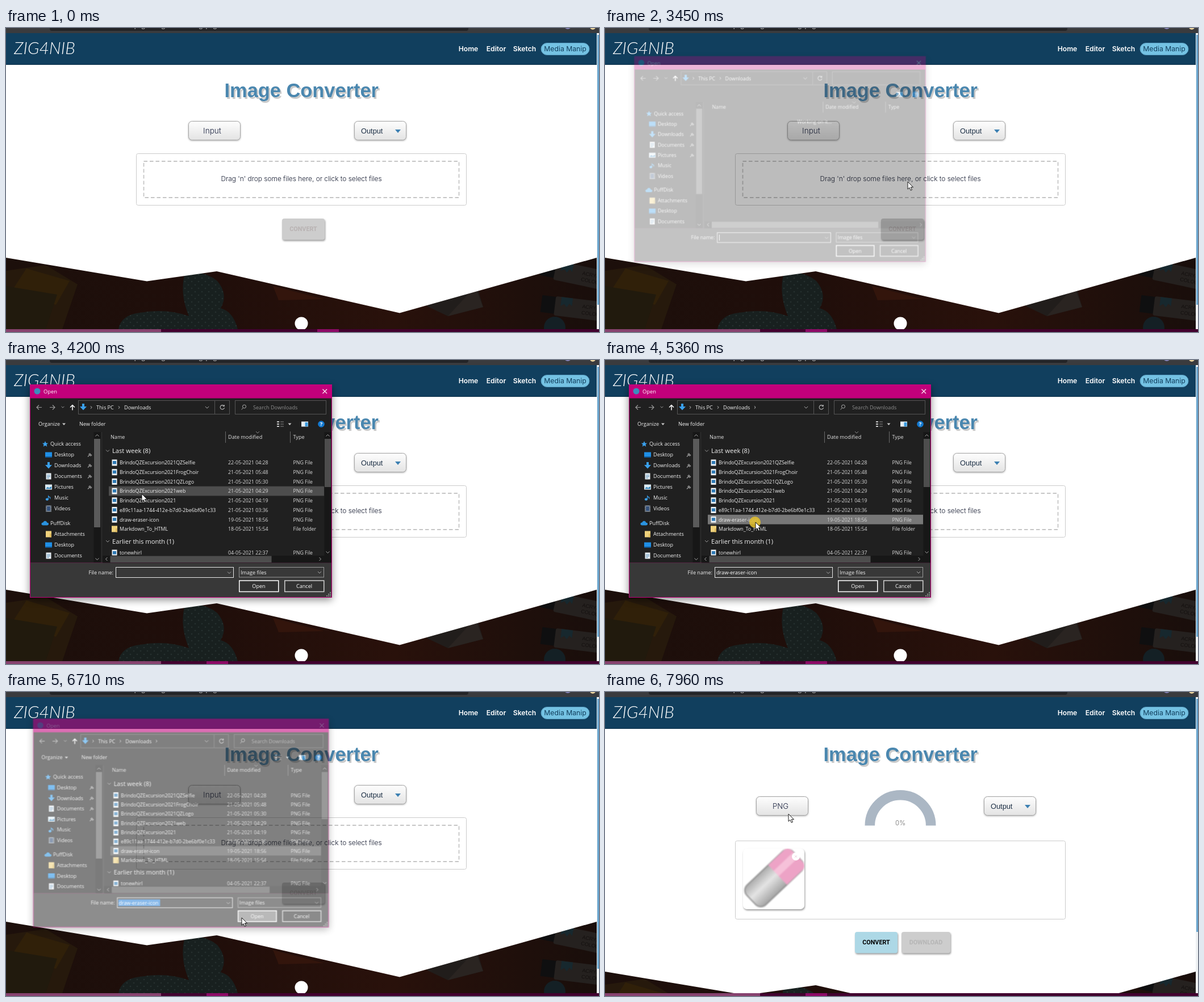
Animation, 1044 px wide and 536 px high, one loop 8 s. Source, as an HTML page:

```html
<!DOCTYPE html>
<html lang="en">
<head>
<meta charset="utf-8">
<title>Image Converter</title>
<style>
  html, body { margin: 0; width: 100%; height: 100%; overflow: hidden; background: #fff; }
  svg { display: block; width: 100%; height: 100%; }
  text { white-space: pre; }
  .ui { font-family: "Open Sans", "Noto Sans", sans-serif; }
  .web { font-family: Inter, sans-serif; }
  .arial { font-family: "Liberation Sans", Arial, sans-serif; }
  .btn { font-family: Roboto, sans-serif; font-weight: 700; }
  .logo { font-family: Lato, sans-serif; font-style: italic; font-weight: 300; }
  #dialog { transform-origin: 308px 230.8px; }
  #ring { transform-origin: 543.3px 270.7px; }
  .soft { filter: drop-shadow(1px 2px 1.5px rgba(0,0,0,.4)); }
  .key { filter: drop-shadow(0 1px 1.5px rgba(0,0,0,.3)); }
</style>
</head>
<body>
<svg id="stage" viewBox="0 0 1044 536" preserveAspectRatio="none"></svg>
<script>
const LOOP = 8000;

// ---- drawing helpers ----
const rect = (x, y, w, h, fill, more = '') =>
  `<rect x="${x}" y="${y}" width="${w}" height="${h}" fill="${fill}" ${more}/>`;
const frame = (x, y, w, h, line, more = '') =>
  rect(x + .5, y + .5, w - 1, h - 1, 'none', `stroke="${line}" ${more}`);
const text = (x, y, str, size, fill, cls = 'ui', more = '') =>
  `<text x="${x}" y="${y}" font-size="${size}" fill="${fill}" class="${cls}" ${more}>${str}</text>`;
const mid = 'text-anchor="middle"';
const path = (d, line, width = 1, fill = 'none', more = '') =>
  `<path d="${d}" stroke="${line}" stroke-width="${width}" fill="${fill}" ${more}/>`;
const shape = (d, fill, more = '') => `<path d="${d}" fill="${fill}" ${more}/>`;
const dot = (x, y, r, fill, more = '') => `<circle cx="${x}" cy="${y}" r="${r}" fill="${fill}" ${more}/>`;
const group = (id, body, more = '') => `<g id="${id}" ${more}>${body}</g>`;
// small chevron pointing down, up, left or right
const chev = (x, y, dir, line = '#aaa', s = 3) => {
  const turn = { down: 0, left: 90, up: 180, right: 270 }[dir];
  return path(`M${-s} ${-s / 2}L0 ${s / 2}L${s} ${-s / 2}`, line, 1, 'none', `transform="translate(${x} ${y}) rotate(${turn})"`);
};

// ---- page ----
const key = (x, y) => rect(x + .5, y + .5, 91, 33, 'url(#face)', 'rx="6" stroke="#a6a6a6" class="key"');
const output = (x, y) => key(x, y) + text(x + 12, y + 22, 'Output', 12.8, '#1c2f45', 'arial') +
  shape(`M${x + 72} ${y + 15}h10l-5 6z`, '#3c80b2');
const plate = (x, y, w, label, fill, ink, id = '') =>
  rect(x, y, w, 37.5, fill, `rx="4" class="soft" id="${id}"`) +
  text(x + w / 2, y + 21.6, label, 10.8, ink, 'btn', mid);

const defs = `<defs>
  <linearGradient id="face" x2="0" y2="1"><stop stop-color="#fefefe"/><stop offset="1" stop-color="#e3e3e3"/></linearGradient>
  <linearGradient id="wood"><stop stop-color="#1c0f0b"/><stop offset=".35" stop-color="#200e0a"/><stop offset=".65" stop-color="#29110b"/><stop offset="1" stop-color="#190e0b"/></linearGradient>
  <linearGradient id="steel" x2="0" y2="1"><stop stop-color="#ababab"/><stop offset=".45" stop-color="#e4e4e4"/><stop offset="1" stop-color="#a4a4a4"/></linearGradient>
  <pattern id="dots" width="12" height="12" patternUnits="userSpaceOnUse">${dot(3, 3, 1.3, '#26302f')}${dot(9, 9, 1.3, '#26302f')}</pattern>
  <clipPath id="view"><rect y="9" width="1040" height="522"/></clipPath>
  <clipPath id="list"><rect x="170" y="127" width="391" height="217.5"/></clipPath>
  <clipPath id="card"><rect x="243" y="276" width="108" height="107" rx="7"/></clipPath>
</defs>`;

const wing = 'M314 436Q345 424 372 446Q392 470 378 494Q400 500 408 531H198Q202 506 236 502Q282 494 322 508Q306 470 314 436z';
const tube = (x, y, turn) => `<g transform="translate(${x} ${y}) rotate(${turn})">
  ${rect(-58, -16, 28, 30, '#0f0f10')}${rect(-34, -17, 90, 34, '#25211f', 'rx="3"')}
  ${shape('M-24-17h20v14l-5-4-4 7-5-5-6 4z', '#17282e')}
  ${text(14, -2, 'ACRYLIC', 9, '#14100f', 'arial')}${text(14, 9, 'COLOUR', 9, '#14100f', 'arial')}</g>`;
const footer = group('footer',
  `<clipPath id="zig"><path d="M0 405L248 446.5L371 429L693 502.5L1040 405V560H0z"/></clipPath>
  <g clip-path="url(#zig)">${rect(0, 400, 1040, 160, 'url(#wood)')}
  ${shape('M0 428L70 418L126 452L96 540H0z', '#26190c')}${shape('M36 424L112 446L88 488L6 470z', '#302009')}
  ${shape('M0 455L90 470L70 531H0z', '#211a0d')}
  ${shape(wing, '#18201f')}${shape(wing, 'url(#dots)')}
  ${shape('M470 455L560 478L480 480z', '#33150c')}
  ${shape('M740 490L828 452L840 492L778 508z', '#211d1b')}${shape('M778 508L826 456L840 492z', '#2a2421')}
  ${tube(1000, 434, 12)}${tube(1000, 494, 7)}${dot(966, 528, 19, '#142025')}
  ${dot(520, 521, 11.5, '#fff')}</g>`);

const before = group('before',
  key(321, 164) + text(363, 185.5, 'Input', 13.6, '#1c2440', 'web', mid + ' font-weight="300"') + output(613, 164) +
  frame(229, 221, 582, 92, '#cbcbcb', 'rx="3"') +
  rect(242.5, 235, 555, 64, 'none', 'stroke="#c6c6c6" stroke-width="1.8" stroke-dasharray="6.5 4"') +
  text(520, 270, "Drag 'n' drop some files here, or click to select files", 11.9, '#151b30', 'web', mid + ' font-weight="300"') +
  plate(486, 336, 75, 'CONVERT', '#cdcdcd', '#b8b2b2'));

const after = group('after',
  key(266, 184) + text(309, 206, 'PNG', 13.2, '#1c2440', 'web', mid + ' font-weight="300"') + output(667, 184) +
  path('M466.3 235.5a53.7 53.7 0 0 1 107.4 0', '#abb7c4', 17.6) +
  text(520, 235, '0%', 11.5, '#6a6a6a', 'web', mid + ' font-weight="300"') +
  frame(229, 262, 582, 139, '#cbcbcb', 'rx="3"') +
  rect(243, 276, 108, 107, '#fff', 'rx="7" class="soft"') +
  `<g clip-path="url(#card)"><g transform="translate(298 328) rotate(-43.5)" style="filter:blur(1px)">
    ${rect(-56, -24, 112, 48, 'url(#steel)', 'rx="13" stroke="#8c8c8c" stroke-width="2"')}
    ${shape('M8-24H46q10 0 10 12V12q0 12-10 12H8z', '#eda3c6')}${rect(8, -10, 48, 13, '#f6c1d9')}
  </g></g>` + dot(336, 290, 7, '#fff') + path('M334 288l4 4m0-4l-4 4', '#ecd7e2', 1) +
  plate(440, 423, 75, 'CONVERT', '#add8e6', '#000', 'go') +
  plate(522, 423, 86, 'DOWNLOAD', '#cdcdcd', '#b5b5b5'));

const nav = rect(0, 9, 1040, 56, '#113f5e') + rect(0, 64, 1040, 1, '#0d3048') +
  text(14, 46, 'ZIG4NIB', 30, '#fff', 'logo') +
  [[814, 'Home'], [863, 'Editor'], [913, 'Sketch']]
    .map(([x, s]) => text(x, 41, s, 12.2, '#fff', 'web', mid + ' font-weight="600"')).join('') +
  rect(942, 26.5, 85, 21, '#74c2e3', 'rx="10.5" stroke="#5a9fc2"') +
  text(984.5, 41, 'Media Manip', 12.2, '#113f5e', 'web', mid);

const chrome = rect(0, 0, 1044, 9, '#3a3b3e') + rect(77, -10, 737, 15, '#232427', 'rx="4"') +
  text(112, -1, 'localhost:3000/media-page/image, converting, png', 11, '#d8d8d8', 'ui') +
  dot(989, -4, 6, '#8784bb') + dot(1033, -2, 5, '#e6cf9b');
const bar = rect(0, 531, 1044, 5, '#42022f') + rect(0, 531, 273, 5, '#87426f') +
  rect(548, 531, 38, 5, '#8c0a66', 'id="task"');
const scroll = rect(1040, 9, 4, 522, '#eef1f3') + rect(1041, 12, 3, 476, '#6aa6cf', 'id="thumb"');

const page = rect(0, 0, 1044, 536, '#fff') + `<g clip-path="url(#view)">${footer}</g>` + nav +
  text(387, 124.5, 'Image Converter', 34.4, '#cbcbcb', 'arial', 'font-weight="700"') +
  text(384.5, 122, 'Image Converter', 34.4, '#4a87af', 'arial', 'font-weight="700"') +
  before + after + scroll + chrome + bar;

// ---- file dialog ----
const blue = '#3aa0ec';
const icons = {
  star: (x, y) => shape(`M${x} ${y - 5}l1.5 3.4 3.6.3-2.7 2.4.9 3.6-3.3-2-3.3 2 .9-3.6-2.7-2.4 3.6-.3z`, blue),
  screen: (x, y) => rect(x - 6, y - 4.5, 12, 8, '#1f8fe6') + rect(x - 6, y + 3.5, 12, 1.5, '#0d5fa8'),
  down: (x, y) => shape(`M${x - 2} ${y - 6}h4v5h4l-6 6.5-6-6.5h4z`, blue),
  page: (x, y) => rect(x - 4.5, y - 5.5, 9, 11, '#e8eef2') + path(`M${x - 3} ${y - 2}h6m-6 2.5h6m-6 2.5h4`, '#4a86b4'),
  image: (x, y) => rect(x - 6, y - 4.5, 12, 9, '#dcebf3') + shape(`M${x - 5} ${y + 3}l3-3 3 1.6 4-2.6v4z`, '#2d80ba'),
  note: (x, y) => shape(`M${x - 1} ${y - 6}q0 3 4 4.5q1 3-1 4q1-3-2-4v4a2.6 2.2 0 1 1-1-1.6z`, blue),
  film: (x, y) => rect(x - 5, y - 5.5, 10, 11, '#8d99a5') + rect(x - 2.8, y - 4, 5.6, 8, '#34507a') +
    path(`M${x - 4} ${y - 5}v10m8-10v10`, '#222', 1.2, 'none', 'stroke-dasharray="1.2 1.2"'),
  cloud: (x, y) => shape(`M${x - 4} ${y + 4}q-3-.5-2.5-3.2q.6-2 2.8-1.8q1.3-3.5 4.6-2.6q2 .6 2.4 2.8q3 .2 2.8 2.6q-.3 2-2.4 2.2z`, '#2a93e0'),
  folder: (x, y) => rect(x - 5, y - 5.5, 10, 11, '#f0d27c') + rect(x + 2, y - 1, 3, 6.5, '#dcb95c'),
  file: (x, y) => rect(x - 4.5, y - 5.5, 9, 11, '#eef2f5') + rect(x - 3, y - 3, 6, 5.5, '#2c79b5')
};
const pin = y => path(`M144 ${y + 3.5}l3-3m-1.5-2l4 4m-2.5-5l4 4`, '#9a9a9a', 1.3);
const side = [
  ['star', 'Quick access', 148, 0], ['screen', 'Desktop', 167, 1, 1], ['down', 'Downloads', 186, 1, 1],
  ['page', 'Documents', 205, 1, 1], ['image', 'Pictures', 224, 1, 1], ['note', 'Music', 243, 1], ['film', 'Videos', 262, 1],
  ['cloud', 'PuffDisk', 287.5, 0], ['folder', 'Attachments', 307, 1], ['screen', 'Desktop', 326, 1], ['page', 'Documents', 345, 1]
].map(([icon, name, y, deep, pinned]) => icons[icon](deep ? 75 : 69, y) +
  text(deep ? 85 : 78, y + 3.3, name, 9.1, '#f0f0f0') + (pinned ? pin(y) : '')).join('');

const rowY = i => 181 + 16.7 * i;
const album = 'BrindoQZExcursion2021';
const fileRow = (y, name, date, type = 'PNG File') =>
  icons[type === 'PNG File' ? 'file' : 'folder'](191, y) + text(200, y + 3.3, name, 8.8, '#f2f2f2') +
  text(391, y + 3.3, date, 8.8, '#d8d8d8') + text(505.5, y + 3.3, type, 8.8, '#d8d8d8');
const files = [
  [album + 'QZSelfie', '22-05-2021 04:28'], [album + 'FrogChoir', '21-05-2021 05:48'],
  [album + 'QZLogo', '21-05-2021 05:30'], [album + 'web', '21-05-2021 04:29'], [album, '21-05-2021 04:19'],
  ['e89c11aa-1744-412e-b7d0-2be6bf0e1c33', '21-05-2021 03:36'], ['draw-eraser-icon', '19-05-2021 18:56'],
  ['Markdown_To_HTML', '18-05-2021 15:54', 'File folder']
].map((f, i) => fileRow(rowY(i), ...f)).join('');
const heading = (y, s) => chev(179, y, 'down', '#999') + text(187, y + 4, s, 11.2, '#f0f0f0');

const loaded = group('loaded',
  `<g clip-path="url(#list)">` +
  rect(181, rowY(0) - 8.4, 379, 16.8, '#4d4d4d', 'id="hover"') +
  rect(181, rowY(6) - 8.4, 379, 16.8, '#777', 'id="picked"') +
  heading(160, 'Last week (8)') + files + heading(319.5, 'Earlier this month (1)') +
  fileRow(340, 'tonewhirl', '04-05-2021 22:37') + '</g>' +
  rect(560.5, 127, 12, 218, '#171717') + rect(561, 139, 11, 85, '#4d4d4d') +
  chev(566.5, 133, 'up') + chev(566.5, 339, 'down') +
  rect(170, 345, 403, 12.5, '#171717') + rect(183.5, 345.5, 284, 11.5, '#4d4d4d') +
  chev(177, 351, 'left') + chev(553, 351, 'right'));
const waiting = group('waiting',
  text(371, 166, 'Working on it...', 9, '#f0f0f0', 'ui', mid) +
  rect(170, 345, 403, 12.5, '#171717') + rect(183.5, 345.5, 304, 11.5, '#5a5a5a') +
  chev(177, 351, 'left') + chev(565, 351, 'right'));
const tools = group('tools',
  text(57, 116, 'Organize', 9.1, '#f0f0f0') + shape('M99 111.5h6l-3 3.4z', '#ccc') +
  text(129, 116, 'New folder', 9.1, '#f0f0f0') +
  path('M477 109h4m-4 4h4m-4 4h4', '#c8c8c8', 2) + path('M483 109h6m-6 4h6m-6 4h6', '#888', 1) +
  shape('M496.5 111.5h6l-3 3.4z', '#ccc') +
  dot(419.5, 82, 3, 'none', 'stroke="#aaa"') + path('M417.3 84.5l-2.6 3', '#aaa') +
  text(435, 87, 'Search Downloads', 9.1, '#8c8c8c'));
const button = (x, label, line, id = '') => rect(x + .75, 389, 69, 19.5, '#333', `stroke="${line}" stroke-width="1.5" id="${id}"`) +
  text(x + 35, 402, label, 9.1, '#fff', 'ui', mid);

const dialog = group('dialog',
  `<g style="filter:drop-shadow(0 4px 7px rgba(0,0,0,.45))">${rect(42, 43, 532, 376, '#c2007b')}</g>` +
  rect(43, 67.5, 530, 290, '#202020') + rect(43, 357.5, 530, 60.5, '#383838') +
  group('caption', dot(55, 55, 5.5, '#3c8dbd') + text(66, 59, 'Open', 9.3, '#fff') +
    path('M557.5 51.5l7.5 7.5m0-7.5l-7.5 7.5', '#fff', 1.1)) +
  path('M63 83.5h-9m4-4l-4 4 4 4', '#999', 1.2) + path('M77 83.5h9m-4-4l4 4-4 4', '#999', 1.2) +
  chev(100, 83, 'down', '#999', 2.4) + path('M117 88.500v-9m-4 4l4-4 4 4', '#fff', 1.5) +
  frame(127, 71, 267, 25, '#555') + path('M367.500 72v23', '#555') +
  icons.down(136, 83) + chev(150, 83.5, 'right', '#ccc', 2.2) + text(159, 87, 'This PC', 9.1, '#f0f0f0') +
  chev(199, 83.5, 'right', '#ccc', 2.2) + text(208, 87, 'Downloads', 9.1, '#f0f0f0') +
  group('crumb', chev(264, 83.5, 'right', '#ccc', 2.2)) + chev(354, 83.5, 'down', '#aaa', 3.2) +
  path('M383.500 80.700a3.700 3.700 0 1 0 1 3.300m-.2-5v2.500h-2.600', '#bbb', 1.1) +
  frame(403, 71, 161, 25, '#555') + tools +
  rect(520, 108.5, 12, 9, '#e6eef4') + rect(526.5, 110, 5, 7, '#3b9be0') +
  dot(555, 113, 5.8, '#1479d0') + text(555, 116.4, '?', 9.5, '#fff', 'ui', mid + ' font-weight="700"') +
  side + rect(154.500, 127, 12, 230, '#171717') + rect(155, 139, 11, 156, '#5a5a5a') +
  chev(160.500, 133, 'up') + chev(160.500, 351, 'down') + rect(168, 127, 1.2, 230, '#303030') +
  path('M386.500 126v20m114-20v20', '#6a6a6a') + chev(443, 127.500, 'down', '#888') +
  text(184, 139, 'Name', 9.1, '#e0e0e0') + text(391, 139, 'Date modified', 9.1, '#e0e0e0') +
  text(505.5, 139, 'Type', 9.1, '#e0e0e0') + waiting + loaded +
  text(189, 377.500, 'File name:', 9.1, '#f0f0f0', 'ui', 'text-anchor="end"') +
  frame(193, 365, 208, 19, '#e8e8e8') + chev(393, 375, 'down') +
  group('caret', path('M197.500 369v11', '#fff')) +
  rect(195.5, 368.5, 75, 12, '#2f86dc', 'id="mark"') +
  group('chosen', text(196, 378, 'draw-eraser-icon', 9.1, '#fff')) +
  frame(410, 365, 150, 18.500, '#9a9a9a') + text(413, 377.500, 'Image files', 9.1, '#f0f0f0') + chev(552, 374.500, 'down') +
  button(410, 'Open', '#fff', 'open') + button(490, 'Cancel', '#d0d0d0') +
  path('M564 416h2m1 0h2m1 0h2m-5-3h2m1 0h2m-2-3h2', '#aaa', 1.6));

// ---- pointer ----
const pointer = group('click', dot(0, 0, 10, '#e3c02c', 'opacity=".85"')) +
  group('ring', dot(543.3, 270.7, 4.4, '#cfeafa', 'stroke="#1c87d4" stroke-width="3.4"') +
    path('M543.300 266.300a4.400 4.400 0 0 1 4.400 4.400', '#5fc0f4', 2.6)) +
  group('arrow', path('M0 0V13.200L3 10.500L5.200 15.300L7.400 14.300L5.300 9.700H9.500z', '#000', .9, '#fff'));

document.getElementById('stage').innerHTML = defs + page + dialog + pointer;

// ---- motion: every table is [ms, value], each value held until the next ----
function play(id, prop, table) {
  const frames = table.map(([t, v]) => ({ offset: t / LOOP, [prop]: v, easing: 'steps(1)' }));
  frames.push({ offset: 1, [prop]: table[table.length - 1][1] });
  document.getElementById(id).animate(frames, { duration: LOOP, iterations: Infinity });
}
const show = (id, ...spans) => play(id, 'opacity',
  [[0, spans[0][0] === 0 ? 1 : 0], ...spans.flatMap(([a, b]) => [[a, 1], [b, 0]]).filter(([t]) => t > 0 && t < LOOP)]);

const track = [[0, 847, 545]];
function glide(t0, t1, n, x, y, bendX, bendY) {
  const [, x0, y0] = track[track.length - 1];
  const cx = bendX ?? (x0 + x) / 2, cy = bendY ?? (y0 + y) / 2;
  for (let i = 1; i <= n; i++) {
    const u = i / n, k = u * u * (3 - 2 * u), m = 1 - k;
    track.push([t0 + (t1 - t0) * (i - 1) / (n - 1),
      m * m * x0 + 2 * m * k * cx + k * k * x, m * m * y0 + 2 * m * k * cy + k * k * y]);
  }
}
glide(600, 730, 3, 835, 519);
glide(980, 1240, 5, 573, 328);
glide(1510, 1770, 5, 533, 271);
glide(3920, 4200, 5, 239, 236);
glide(4400, 5090, 11, 265, 286, 236, 270);
glide(5550, 6350, 13, 415, 398);
glide(7440, 7960, 9, 323, 215, 290, 470);
play('arrow', 'transform', track.map(([t, x, y]) => [t, `translate(${x}px,${y}px)`]));

play('click', 'transform', [[0, 'translate(533px,271px)'], [4000, 'translate(264px,286px)'], [6000, 'translate(415px,398px)']]);
show('click', [2100, 2200], [5360, 5550], [6410, 6630]);

show('ring', [2310, 3450]);
play('ring', 'transform', [[0, 'rotate(0deg)'],
  ...Array.from({ length: 7 }, (_, i) => [2790 + 70 * i, `rotate(${(i + 1) * 51}deg)`])]);
play('task', 'transform', [[0, 'none'], [2310, 'translate(-195px,0)']]);

const pose = [[0, 0, .95], [3450, .3, .965], [3510, .62, .982], [3570, .85, .9925], [3640, 1, 1],
  [6630, .88, .994], [6670, .73, .987], [6710, .57, .979], [6770, .27, .968], [6830, 0, .95]];
play('dialog', 'opacity', pose.map(([t, o]) => [t, o]));
play('dialog', 'transform', pose.map(([t, , s]) => [t, `scale(${s})`]));
play('caption', 'opacity', [[0, 1], [6630, .45]]);
show('tools', [3640, LOOP]);
show('waiting', [0, 3920]);
show('loaded', [3920, LOOP]);
show('caret', [3450, 3720]);
show('crumb', [4400, LOOP]);
show('chosen', [5360, LOOP]);
show('mark', [6410, LOOP]);
show('picked', [5360, LOOP]);
play('picked', 'fill', [[0, '#777'], [5750, '#626262'], [6410, '#4a4a4a']]);
play('open', 'fill', [[0, '#333'], [6220, '#6c6c6c'], [6410, '#858585']]);

// the row under the pointer lights up
const hovers = track.filter(([t]) => t >= 3920 && t < 5360).map(([t, , y]) => [t, Math.floor((y - rowY(0) + 8.4) / 16.7)]);
play('hover', 'transform', [[0, 'none'], ...hovers.map(([t, i]) => [t, `translate(0,${i * 16.7}px)`])]);
show('hover', [3920, 5360]);

const SWAP = 6980;
show('before', [0, SWAP]);
show('after', [SWAP, LOOP]);
play('footer', 'transform', [[0, 'none'], [SWAP, 'translate(0,88px)']]);
play('thumb', 'height', [[0, '476px'], [SWAP, '411px']]);
play('go', 'fill', [[0, '#cdcdcd'], [SWAP + 50, '#c2d1d6'], [SWAP + 100, '#b8d4de'], [SWAP + 200, '#add8e6']]);
</script>
</body>
</html>
```
